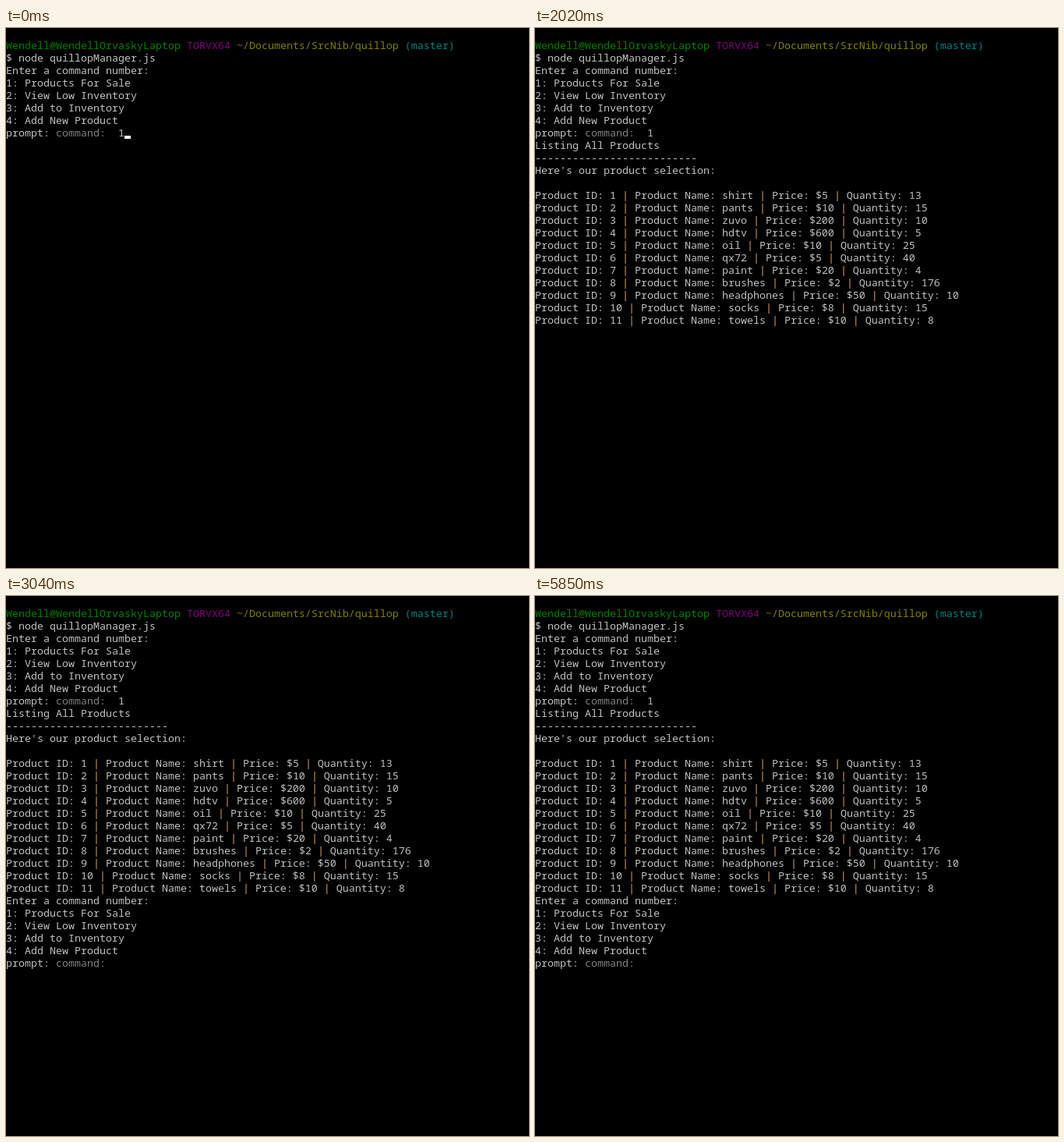
Recreate the animation shown at these times as an HTML page. Size 671 by 692 pixels, loop 5930 ms.

```html
<!DOCTYPE html>
<html lang="en">
<head>
<meta charset="utf-8">
<title>Terminal</title>
<style>
  html, body { margin: 0; width: 100%; height: 100%; overflow: hidden; background: #000; }
  svg { display: block; }
  text { font: 13.3333px "Noto Sans Mono", monospace; white-space: pre; fill: #c0c0c0; }
  .green { fill: #008000; }
  .purple { fill: #800080; }
  .olive { fill: #808000; }
  .teal { fill: #008080; }
  .gray { fill: #808080; }
  .bar { fill: #dca468; }
</style>
</head>
<body>
<svg id="screen" width="671" height="692" viewBox="0 0 671 692">
  <rect id="cursor" width="8" height="4" fill="#fff"/>
</svg>
<script>
const NS = "http://www.w3.org/2000/svg";
const CELL = 8, ROW = 16, BASELINE = 27, LOOP = 5930;
const screen = document.getElementById("screen");
const cursor = document.getElementById("cursor");

const menu = [
  "Enter a command number:",
  "1: Products For Sale",
  "2: View Low Inventory",
  "3: Add to Inventory",
  "4: Add New Product"
];

const products = [
  ["shirt", 5, 13], ["pants", 10, 15], ["zuvo", 200, 10], ["hdtv", 600, 5],
  ["oil", 10, 25], ["qx72", 5, 40], ["paint", 20, 4], ["brushes", 2, 176],
  ["headphones", 50, 10], ["socks", 8, 15], ["towels", 10, 8]
];

const describe = ([name, price, count], i) =>
  `Product ID: ${i + 1} {bar:|} Product Name: ${name} {bar:|} Price: $${price} {bar:|} Quantity: ${count}`;

const prompt = "prompt: {gray:command:}";

// {class:text} marks a coloured run
const lines = [
  "{green:Wendell@WendellOrvaskyLaptop} {purple:TORVX64} {olive:~/Documents/SrcNib/quillop} {teal:(master)}",
  "$ node quillopManager.js",
  ...menu,
  prompt + "  1",
  "Listing All Products",
  "-".repeat(26),
  "Here's our product selection:",
  "",
  ...products.map(describe),
  ...menu,
  prompt
];

function addLine(line, row) {
  const text = document.createElementNS(NS, "text");
  text.setAttribute("x", 0);
  text.setAttribute("y", BASELINE + row * ROW);
  for (const part of line.split(/(\{\w+:[^}]+\})/)) {
    if (!part) continue;
    const run = part.match(/^\{(\w+):(.+)\}$/);
    const span = document.createElementNS(NS, "tspan");
    if (run) span.setAttribute("class", run[1]);
    span.textContent = run ? run[2] : part;
    text.append(span);
  }
  screen.insertBefore(text, cursor);
  return text;
}

const rows = lines.map(addLine);

// time, visible lines, cursor column, cursor row, cursor shown
const steps = [
  [0, 8, 19, 7, true],
  [950, 8, 19, 7, false],
  [1100, 23, 0, 23, true],
  [2020, 23, 0, 23, false],
  [2570, 28, 0, 28, true],
  ...[2650, 3040, 3590, 4140, 4690, 5150, 5700, 5850]
    .map((time, i) => [time, 29, 18, 28, i % 2 === 0])
];

let current;

function show(step) {
  if (step === current) return;
  current = step;
  const [, count, col, row, lit] = step;
  rows.forEach((text, i) => text.setAttribute("visibility", i < count ? "visible" : "hidden"));
  cursor.setAttribute("x", col * CELL);
  cursor.setAttribute("y", BASELINE - 1 + row * ROW);
  cursor.setAttribute("visibility", lit ? "visible" : "hidden");
}

const start = performance.now();

function tick() {
  const time = (performance.now() - start) % LOOP;
  show(steps.filter(step => step[0] <= time).pop());
  requestAnimationFrame(tick);
}

tick();
</script>
</body>
</html>
```
